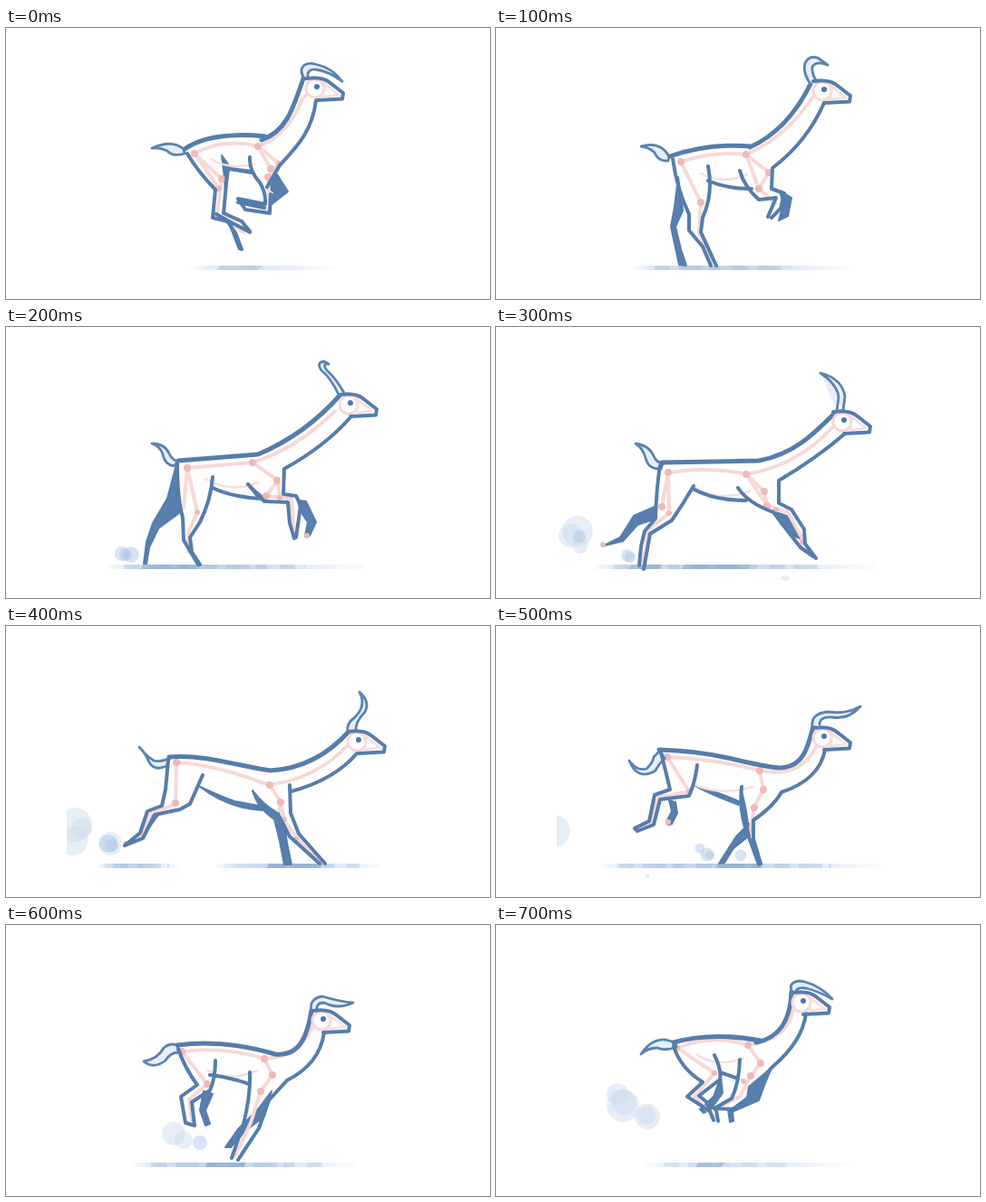
Write an HTML page without scripts that moves like this. It is 534x300 px and loops after 0.8 s.

```html
<!DOCTYPE html>
<html lang="en">
<head>
<meta charset="utf-8">
<title>Gazelle run cycle</title>
<style>
html, body { margin: 0; width: 100%; height: 100%; overflow: hidden; background: #fff; }
svg { display: block; width: 100vw; height: 100vh; }
path { fill: none; stroke-linecap: round; stroke-linejoin: round; }
.pose { visibility: hidden; animation: show 800ms step-end infinite; animation-delay: calc(var(--i) * 100ms - 800ms); }
@keyframes show { 0% { visibility: visible; } 12.5%, 100% { visibility: hidden; } }
.back { stroke: #557dac; stroke-width: 5; }
.line { stroke: #557dac; stroke-width: 4; }
.tuft { stroke: #5a83b1; stroke-width: 2.8; fill: #e6eff8; }
.far { fill: #587fae; stroke: #557dac; stroke-width: 2; }
.bone { stroke: #f7d9d7; stroke-width: 4; }
.soft { stroke: #f8dfdd; stroke-width: 2.5; }
.joint { stroke: #efb9b9; stroke-width: 8; }
.small { stroke-width: 6; }
.dust { fill: #a9c4e4; fill-opacity: .45; }
.haze { fill: #c9daee; fill-opacity: .45; }
.ground { fill: url(#fade); }
.dash { stroke: #86a8d0; stroke-opacity: .26; stroke-width: 5; stroke-linecap: butt; stroke-dasharray: 17 10 26 7 12 14; }
.dark { fill: #7c9fca; fill-opacity: .5; }
.pale { opacity: .6; }
</style>
</head>
<body>
<svg viewBox="0 0 534 300">
<defs>
  <linearGradient id="fade">
    <stop offset="0" stop-color="#dfe9f5" stop-opacity=".2"/>
    <stop offset=".12" stop-color="#d6e2f1"/>
    <stop offset=".4" stop-color="#c0d3e9"/>
    <stop offset=".65" stop-color="#d3e0f0"/>
    <stop offset="1" stop-color="#eaf1f9" stop-opacity=".3"/>
  </linearGradient>
  <clipPath id="stage"><path d="M67 0H534V300H67z"/></clipPath>
  <g id="head">
    <circle cx="-2" cy="2" r="10" fill="#fff" stroke="#f7d9d7" stroke-width="3"/>
    <path class="soft" d="M6-5L24 9 7 11M9-4L7 11"/>
    <path class="line" d="M-12-9Q6-12 15-4L29 7 28 13.5 0 15"/>
    <circle r="3" fill="#4a76ac"/>
  </g>
</defs>
<g clip-path="url(#stage)">

<g class="pose" style="--i:0">
  <rect class="ground pale" x="203" y="263" width="162" height="5"/>
  <path class="dark pale" d="M232 268l4-5h46l-4 5z"/>
  <path class="far" d="M299 162L311 181 292 196 296 181 288 178zM247 219L254 226 261 245 257 245zM238 141L248 155 271 158 271 161 246 157 242 182 241 165z"/>
  <path class="bone" d="M208 139Q240 121 278 131Q312 118 326 80L335 70M208 139L238 167 233 206 262 226M208 139L235 178M278 131L301 150 289 165 291 201 262 194M278 131L292 156"/>
  <path class="soft" d="M226 145Q245 157 274 151"/>
  <path class="joint" d="M208 139h0M278 131h0M292 156h0M289 165h0M238 167h0"/>
  <path class="joint small" d="M301 150h0M235 178h0"/>
  <path class="tuft" d="M161 133Q183 123 196 134L197 139Q184 143 178 136Q170 132 161 133z"/>
  <path class="back" d="M197 134Q225 114 286 120M282 124C310 114 317 88 328 56"/>
  <path class="line" d="M342 80C338 116 318 134 302 152L288 176M200 139Q211 158 231 179L228 210 244 214Q252 223 254 234L260 245M244 160L242 184 240 205 260 214 269 225M232 206L250 216 269 226M269 143Q268 158 280 171Q287 182 286 195L256 189 264 201 291 205 292 184M256 193L285 199"/>
  <path class="tuft" d="M328 54C322 43 331 37 341 40Q360 44 371 59Q356 48 342 46Q332 45 333 54"/>
  <use href="#head" x="343" y="65"/>
</g>

<g class="pose" style="--i:1">
  <rect class="ground" x="150" y="263" width="240" height="5"/>
  <path class="dash" d="M175 265.5H315"/>
  <path class="far" d="M201 165L206 202 198 220 204 245 210 263 202 262 193 220 197 198zM313 180L326 188 322 208 312 213 317 196z"/>
  <path class="bone" d="M204 148Q240 136 276 140Q320 121 350 76M204 148L226 193 224 226 238 260M276 140L301 160 290 178 308 194M276 140L290 178"/>
  <path class="soft" d="M226 161Q250 174 277 162"/>
  <path class="joint" d="M204 148h0M276 140h0M301 160h0M290 178h0M226 193h0"/>
  <path class="tuft" d="M160 131Q181 125 191 142L190 147Q179 148 175 138Q169 132 160 131z"/>
  <path class="back" d="M192 142Q235 127 282 131M280 132Q322 113 347 62"/>
  <path class="line" d="M362 83Q343 126 305 155L304 178M195 145Q200 180 213 206L213 224 228 242 237 263M234 153Q240 184 228 210L226 226 243 263M234 169Q254 178 282 178M269 158Q274 176 290 190L309 188 300 209M304 178L318 183 314 200 304 210"/>
  <path class="tuft" d="M347 62Q338 49 341 39Q345 30 355 33L366 41Q353 36 349 43Q348 51 354 59"/>
  <use href="#head" x="362" y="68"/>
</g>

<g class="pose" style="--i:2">
  <rect class="ground" x="112" y="263" width="283" height="5"/>
  <path class="dash" d="M130 265.5H330"/>
  <path class="dark" d="M148 268l3-5h64l-3 5z"/>
  <circle class="dust" cx="128" cy="251" r="8"/><circle class="dust" cx="138" cy="252" r="9"/><circle class="dust" cx="132" cy="252" r="7"/>
  <path class="far" d="M188 152L191 206 168 223 158 244 155 262 152 262 155 238 162 217 178 190zM322 192L331 193 342 216 335 231 330 232 333 216 325 204zM266 174L280 185 288 193 278 189z"/>
  <path class="bone" d="M200 156L272 150Q322 134 363 93M200 156L211 205 201 228 201 249M200 156L196 200M272 150L300 170 287 187 315 190 318 230M300 170L302 189"/>
  <path class="soft" d="M220 168Q249 185 278 172"/>
  <path class="joint" d="M200 156h0M272 150h0M299 170h0M287 187h0"/>
  <path class="joint small" d="M211 205h0M302 189h0M332 231h0"/>
  <path class="tuft" d="M161 129Q175 129 180 140Q183 147 190 149L185 154Q175 152 173 141Q170 132 161 129z"/>
  <path class="back" d="M190 148L278 141Q330 119 368 76"/>
  <path class="line" d="M380 100Q352 132 307 157L306 185M189 150Q189 190 195 211L196 236 212 263M228 166Q226 192 214 216L203 233 205 249 214 263M228 178Q248 188 281 190M267 174L285 193 311 194 313 217 318 234M306 185L320 187 325 197 322 219 320 233"/>
  <path class="tuft" d="M367 75Q359 57 348 48Q342 39 351 38L356 41Q348 40 354 48Q365 58 373 73"/>
  <use href="#head" x="380" y="84"/>
</g>

<g class="pose" style="--i:3">
  <rect class="ground" x="108" y="263" width="310" height="5"/>
  <path class="dash" d="M130 265.5H360"/>
  <path class="dark" d="M146 268l3-5h34l-3 5zM205 268l3-5h72l-3 5z"/>
  <circle class="haze" cx="90" cy="226" r="17"/><circle class="haze" cx="82" cy="231" r="13"/><circle class="haze" cx="93" cy="242" r="9"/>
  <circle class="dust" cx="92" cy="232" r="7"/><circle class="dust" cx="145" cy="253" r="7"/><circle class="dust" cx="148" cy="255" r="6"/>
  <ellipse class="haze" cx="319" cy="278" rx="5" ry="3"/>
  <path class="far" d="M175 199L152 209 137 233 119 242 140 237 156 219 174 213zM306 204L326 211 338 235 330 232 315 219z"/>
  <path class="bone" d="M190 161Q235 154 276 163Q334 153 372 110M190 161L191 206 169 224 162 260M190 161L183 199M276 163L296 182 299 198 322 205 340 238M276 163L299 198"/>
  <path class="soft" d="M218 177Q246 194 280 182"/>
  <path class="joint" d="M190 161h0M276 163h0M296 182h0M299 198h0M183 199h0"/>
  <path class="joint small" d="M191 206h0M118 241h0M338 238h0M309 202h0"/>
  <path class="tuft" d="M154 129Q169 131 174 143Q177 150 184 151L182 157Q168 158 165 145Q162 134 154 129z"/>
  <path class="back" d="M183 150L290 148C328 141 350 119 373 96"/>
  <path class="line" d="M385 118Q354 145 312 170L312 195 326 202 340 224 341 240 353 256M181 153Q177 178 176 212L164 226 160 243 158 264M218 176Q207 195 194 214L170 229 163 268M217 179Q240 192 276 192M267 178Q278 195 306 205L325 230 336 244 350 254"/>
  <path class="tuft" d="M358 51Q382 57 385 77L383 92M358 51Q377 64 378 78L376 93"/>
  <use href="#head" x="384" y="103"/>
</g>

<g class="pose" style="--i:4">
  <rect class="ground" x="102" y="263" width="88" height="5"/>
  <rect class="ground" x="232" y="263" width="182" height="5"/>
  <path class="dash" d="M118 265.5H180M290 265.5H390"/>
  <path class="dark" d="M287 268l3-5h60l-3 5z"/>
  <circle class="haze" cx="76" cy="220" r="19"/><circle class="haze" cx="74" cy="238" r="16"/><circle class="haze" cx="84" cy="224" r="11"/>
  <circle class="haze" cx="115" cy="241" r="13"/><circle class="dust" cx="113" cy="241" r="10"/><circle class="dust" cx="117" cy="243" r="7"/>
  <ellipse class="haze" cx="243" cy="271" rx="5" ry="2.5" opacity=".4"/>
  <path class="far" d="M164 206L156 219 156 226 168 209zM272 182Q284 198 300 207L307 219 310 240 315 264 307 264 302 238 296 214Q277 201 272 182zM214 178Q240 190 252 194L284 200 289 204Q248 204 214 178z"/>
  <path class="bone" d="M188 151Q230 153 290 176Q342 169 376 133M188 151L187 197 160 208 149 233 134 240M291 176L303 195 307 215 322 236 346 261M303 195L301 207"/>
  <path class="joint" d="M188 151h0M291 176h0M303 195h0M187 196h0"/>
  <path class="joint small" d="M307 214h0M132 241h0M320 236h0"/>
  <path class="tuft" d="M147 134Q154 143 163 149Q172 151 181 146L177 155Q164 161 158 151Q154 141 147 134z"/>
  <path class="back" d="M180 145C221 142 255 155 292 160Q342 157 378 117"/>
  <path class="line" d="M388 140Q363 170 315 183M313 176L314 207 323 230 338 247 352 263M179 149L176 181 172 199 156 205 148 229 131 243M217 165L203 197 192 203 164 209 151 235 131 243M300 208L313 233 346 263"/>
  <path class="tuft" d="M377 117Q375 108 385 101Q398 88 390 73Q402 84 396 95Q385 107 386 116"/>
  <use href="#head" x="389" y="126"/>
</g>

<g class="pose" style="--i:5">
  <rect class="ground" x="115" y="263" width="310" height="5"/>
  <path class="dash" d="M135 265.5H370"/>
  <path class="dark" d="M242 268l3-5h50l-3 5z"/>
  <circle class="haze" cx="64" cy="227" r="18"/>
  <circle class="dust" cx="225" cy="246" r="5.5"/><circle class="dust" cx="233" cy="253" r="7.5"/><circle class="dust" cx="236" cy="254" r="5"/><circle class="dust" cx="270" cy="254" r="6.5"/>
  <circle class="haze" cx="167" cy="277" r="2.5"/>
  <path class="far" d="M191 193L194 205 188 217 190 220 194 219 200 207 198 195zM279 219L265 233 246 263 252 262 262 246 281 231zM270 178L275 200 279 224 271 206zM218 176Q240 182 270 195L268 198Q238 187 218 176z"/>
  <path class="bone" d="M189 145Q240 147 291 160Q335 169 353 134M189 145L213 183 179 190 171 218 156 222M291 160L295 181 285 200 281 224 291 261"/>
  <path class="soft" d="M217 175Q250 189 283 178"/>
  <path class="joint" d="M189 145h0M291 160h0M295 181h0M285 201h0"/>
  <path class="joint small" d="M213 183h0M283 225h0M190 217h0"/>
  <path class="tuft" d="M147 149Q155 161 166 158Q173 152 174 145L181 138 186 147Q180 152 176 160Q156 172 147 149z"/>
  <path class="back" d="M180 137Q222 138 260 147T312 157C339 157 344 135 350 111"/>
  <path class="line" d="M363 137Q357 170 315 184Q306 200 284 215L284 236 292 263M182 140L187 160 192 181 175 187 169 216 153 224 156 227 174 220 181 192 213 188Q220 172 222 154M271 178Q268 207 278 231L290 264"/>
  <path class="tuft" d="M349 111Q347 97 366 95Q387 98 402 89Q389 104 371 101Q357 100 357 109"/>
  <use href="#head" x="362" y="122"/>
</g>

<g class="pose" style="--i:6">
  <rect class="ground" x="140" y="263" width="244" height="5"/>
  <path class="dash" d="M160 265.5H350"/>
  <path class="dark" d="M220 268l3-5h42l-3 5z"/>
  <circle class="haze" cx="185" cy="231" r="13"/><circle class="haze" cx="196" cy="238" r="10"/><circle class="dust" cx="214" cy="241" r="8"/>
  <path class="far" d="M218 184L214 205 220 222 225 220 220 205 228 187zM293 184L278 204 256 226 242 246 248 246 264 228 285 212z"/>
  <path class="bone" d="M194 140Q240 134 285 148Q326 146 340 108M194 140L222 176 202 193 205 216M285 148L294 166 281 184 270 219 253 255"/>
  <path class="soft" d="M222 161Q247 174 277 161"/>
  <path class="joint" d="M194 140h0M285 148h0M294 166h0M281 184h0M222 176h0"/>
  <path class="tuft" d="M152 151Q168 148 174 136Q181 130 189 133L191 141Q181 141 176 150Q163 160 152 151z"/>
  <path class="back" d="M189 133Q240 126 297 143C326 146 333 119 337 95"/>
  <path class="line" d="M351 119Q346 154 310 172L290 194 279 225 256 260M190 137Q197 158 211 177L193 190 198 219 208 222M231 150Q231 170 225 183L205 196 208 222M225 166Q246 168 268 176M269 163Q270 189 262 220L249 258"/>
  <path class="tuft" d="M337 96Q334 81 349 79Q369 85 383 86Q366 94 351 86Q342 86 343 94"/>
  <use href="#head" x="350" y="104"/>
</g>

<g class="pose" style="--i:7">
  <rect class="ground pale" x="164" y="263" width="232" height="5"/>
  <path class="dash pale" d="M185 265.5H320"/>
  <path class="dark" d="M220 268l4-5h28l-4 5z"/>
  <circle class="haze" cx="134" cy="187" r="12"/><circle class="haze" cx="140" cy="200" r="18"/><circle class="haze" cx="141" cy="196" r="14"/><circle class="haze" cx="167" cy="212" r="14"/><circle class="haze" cx="166" cy="211" r="10"/>
  <path class="far" d="M304 158L297 175 290 194 260 207 266 199 277 191 279 179zM248 168L240 190 225 204 229 208 237 204 250 186zM256 204L258 218 262 217 261 205z"/>
  <path class="bone" d="M200 136Q240 120 278 133Q325 126 328 91M200 136L241 164 219 190 240 212M278 133L292 153 281 167 269 190 246 202"/>
  <path class="soft" d="M221 143Q241 158 273 148"/>
  <path class="joint" d="M278 133h0M292 153h0M281 167h0"/>
  <path class="joint small" d="M200 136h0M241 164h0M273 173h0"/>
  <path class="tuft" d="M160 143Q171 126 187 127L198 130 199 135Q188 140 178 136Q167 136 160 143z"/>
  <path class="back" d="M196 130Q238 118 292 128M287 130C317 124 325 100 326 74"/>
  <path class="line" d="M342 98Q338 129 305 157L292 172M196 134Q203 158 228 174L211 190 236 206 240 216M241 144Q249 160 247 171L224 189 243 205 245 217M247 163L267 170M269 149Q268 176 260 192L241 203 264 204M290 172L276 194 261 204"/>
  <path class="tuft" d="M327 74C321 65 331 60 341 63Q359 68 371 82Q355 73 342 70Q331 68 331 75"/>
  <use href="#head" x="339" y="84"/>
</g>

</g>
</svg>
</body>
</html>
```
